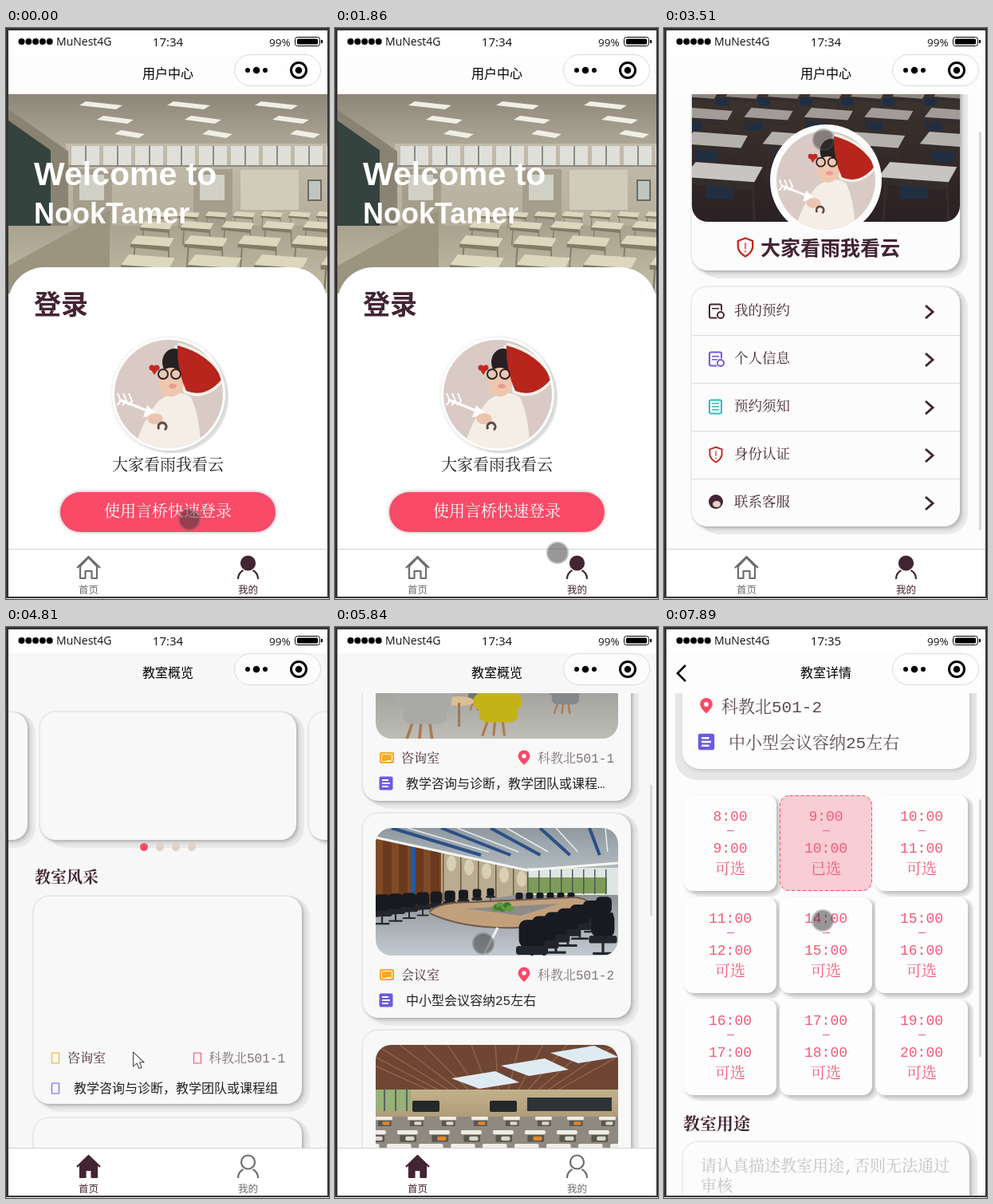
An HTML page with a canvas for the animation above (8000 ms loop, 405x716 px).

```html
<!DOCTYPE html>
<html lang="zh-CN">
<head>
<meta charset="utf-8">
<style>
html, body { margin: 0; width: 100%; height: 100%; overflow: hidden; background: #383436; }
canvas { display: block; width: 405px; height: 716px; }
</style>
</head>
<body>
<canvas id="stage" width="405" height="716"></canvas>
<script>
const ctx = document.getElementById('stage').getContext('2d');
const LOOP = 8000, TICK = 120;
const UI = '"Open Sans", "Noto Sans CJK SC", sans-serif';
const SERIF = '"Liberation Mono", "Noto Serif CJK SC", "Noto Sans CJK SC", monospace';
const PLAIN = '"Liberation Mono", "Noto Sans CJK SC", monospace';
const ARIAL = '"Liberation Sans", sans-serif';
const PLUM = '#432433', PINK = '#f94a68', ORANGE = '#f9a825', VIOLET = '#6a5be2', RED = '#c4281f', GREY = '#6d6d6d';
const APP = 'NookTamer', NICK = '大家看雨我看云', CARRIER = 'MuNest4G';

// Part of a move done: it advances in `count` equal hops, one per tick.
function progress(t, start, count) {
  return Math.max(0, Math.min(count, Math.floor((t - start) / TICK) + 1)) / count;
}

function rect(color, x, y, w, h) { ctx.fillStyle = color; ctx.fillRect(x, y, w, h); }
function trace(x, y, w, h, r) { ctx.beginPath(); ctx.roundRect(x, y, w, h, r); }
function box(color, x, y, w, h, r) { trace(x, y, w, h, r); ctx.fillStyle = color; ctx.fill(); }
function frame(color, lw, x, y, w, h, r) { trace(x, y, w, h, r); ctx.strokeStyle = color; ctx.lineWidth = lw; ctx.stroke(); }
function disc(color, x, y, rx, ry = rx) {
  ctx.beginPath(); ctx.ellipse(x, y, rx, ry, 0, 0, 7); ctx.fillStyle = color; ctx.fill();
}
function ring(color, lw, x, y, r, from = 0, to = 2) {
  ctx.beginPath(); ctx.arc(x, y, r, from * Math.PI, to * Math.PI);
  ctx.strokeStyle = color; ctx.lineWidth = lw; ctx.stroke();
}
function path(p) { ctx.beginPath(); for (let i = 0; i < p.length; i += 2) ctx.lineTo(p[i], p[i + 1]); }
function poly(color, ...p) { path(p); ctx.fillStyle = color; ctx.fill(); }
function line(color, lw, ...p) { path(p); ctx.strokeStyle = color; ctx.lineWidth = lw; ctx.stroke(); }
function shape(d, fill, stroke, lw) {
  const p = new Path2D(d);
  if (stroke) { ctx.strokeStyle = stroke; ctx.lineWidth = lw; ctx.stroke(p); }
  if (fill) { ctx.fillStyle = fill; ctx.fill(p); }
}
function fade(from, to, x, y, w, h) {
  const g = ctx.createLinearGradient(0, y, 0, y + h);
  g.addColorStop(0, from); g.addColorStop(1, to);
  rect(g, x, y, w, h);
}
// Upright strip between two sloping edges, given as functions of x.
function wall(color, x0, x1, top, bottom) {
  poly(color, x0, top(x0), x1, top(x1), x1, bottom(x1), x0, bottom(x0));
}
function text(s, x, y, size, color, { font = UI, weight = 400, align = 'left' } = {}) {
  ctx.font = `${weight} ${size}px ${font}`;
  ctx.textAlign = align;
  ctx.fillStyle = color;
  ctx.fillText(s, x, y + size * 0.37);
}
const thin = (s, x, y, size, color, align) => text(s, x, y, size, color, { font: SERIF, weight: 300, align });
const centered = (s, x, y, size, color) => text(s, x, y, size, color, { align: 'center' });
function group(x, y, scale, draw) {
  ctx.save(); ctx.translate(x, y); ctx.scale(scale, scale); draw(); ctx.restore();
}
function clipped(x, y, w, h, r, draw) {
  ctx.save(); trace(x, y, w, h, r); ctx.clip(); draw(); ctx.restore();
}
function softBox(color, x, y, w, h, r, blur, shadow, off) {
  ctx.save();
  Object.assign(ctx, { shadowColor: shadow, shadowBlur: blur, shadowOffsetX: off, shadowOffsetY: off });
  box(color, x, y, w, h, r);
  ctx.restore();
}
function card(x, y, w, h, color = '#fcfcfc') {
  box('#eaeaea', x + 8, y, w + 2, h + 10, 26);
  softBox(color, x, y, w, h, 20, 5, '#bdbdbd', 3);
  frame('rgba(0,0,0,.05)', 2, x - 1, y - 1, w + 2, h + 2, 20);
}
function scene(draw, x, y, w, h, r) {
  clipped(x, y, w, h, r, () => { ctx.translate(x, y); ctx.scale(w / 304, h / 160); draw(); });
}

// --- pictures ---
function officeChair(x, y, s) {
  group(x, y, s, () => {
    box('#171a20', -9, -18, 18, 19, 5);
    box('#22252b', -11, 0, 22, 6, 2);
    rect('#24272c', -1, 4, 2, 10); rect('#24272c', -8, 13, 16, 2);
  });
}
function meeting() {
  const cornice = x => 12 + x * 0.22, skirting = x => 112 - x * 0.16;
  fade('#8f999f', '#b4bcc1', 0, 0, 304, 55);
  fade('#8b8f92', '#c2c9d0', 0, 80, 304, 80);
  for (let i = 0; i < 5; i++) {
    const x = 20 + i * 62;
    line('#2c4f86', 4, x, 0, 120 + x * 0.6, 34);
    line('#e8ecec', 1.5, x + 20, 0, 130 + x * 0.6, 30);
  }
  wall('#6b3a1e', 0, 82, cornice, skirting);
  for (let x = 0; x < 82; x += 20) wall('#7f4a26', x, x + 9, cornice, skirting);
  wall('#1f5ba6', 44, 50, cornice, skirting);
  wall('#b9ac90', 82, 190, cornice, skirting);
  for (let x = 84; x < 190; x += 22) {
    wall('#6d5a46', x, x + 1.5, cornice, skirting);
    disc('#d9cfb4', x + 11, cornice(x) + 14, 6, 10);
  }
  rect('#dfe5e2', 190, 50, 114, 34); rect('#7d9c58', 190, 62, 100, 20);
  for (let x = 190; x < 300; x += 14) rect('#4d5657', x, 52, 1.5, 31);
  line('#f6f7f4', 3, 0, 12, 190, 53, 304, 44);
  for (let i = 0; i < 9; i++) officeChair(8 + i * 17, 104 - i * 2.4, 1.15 - i * 0.08);
  for (let i = 0; i < 6; i++) officeChair(180 + i * 13, 90, 0.5);
  shape('M68 106 Q78 94 120 94 L250 88 Q282 92 240 104 L178 124 Q110 126 68 106', '#c3a07c', '#6f5a49', 4);
  shape('M112 101 L230 95 L182 110 Z', '#8d8c88');
  line('#f0f2f2', 3, 153, 125, 136, 158);
  for (let i = 0; i < 7; i++) disc(i % 2 ? '#397b31' : '#639b3d', 150 + i * 3, 101 - i % 3 * 2, 5, 4);
  for (let i = 0; i < 7; i++) officeChair(286 - i * 15, 106 + i * 7, 1.1 + i * 0.12);
  officeChair(285, 135, 1.6);
}
function training() {
  rect('#8f8a80', 0, 0, 304, 160);
  rect('#6f4633', 0, 0, 304, 58);
  for (let i = 0; i < 14; i++) line('#94694f', 1.2, i * 30 - 60, 0, 70 + i * 12, 58);
  for (let i = 0; i < 3; i++) shape(`M${95 + i * 62} ${42 - i * 16} l55 -9 l30 14 l-50 8 Z`, '#dfebf2');
  fade('#c3b08b', '#b09c79', 0, 56, 304, 34);
  rect('#95b277', 0, 56, 44, 26);
  for (let x = 10; x < 44; x += 14) rect('#5d6260', x, 55, 2, 28);
  for (const x of [46, 143]) box('#22272a', x, 70, 34, 14, 2);
  rect('#2c3436', 190, 66, 106, 17);
  for (let row = 0; row < 4; row++) for (let i = 0; i < 9; i++) {
    group(i * 40 - row * 13, 90 + row * 17, 0.7 + row * 0.16, () => {
      rect('#59564f', 4, 7, 24, 10);
      box('#efede6', 0, 0, 30, 6, 2);
      box((i + row) % 3 ? '#d9d7d0' : '#df862a', 12, 9, 13, 6, 2);
    });
  }
}
function lounge() {
  fade('#d3d3cc', '#8f9193', 0, 0, 304, 110);
  fade('#a3a39f', '#bdbcb6', 0, 100, 304, 60);
  const seat = (x, y, s, color) => group(x, y, s, () => {
    for (let k = -16; k <= 16; k += 11) line('#ad794e', 3, k * 0.7, 5, k * 1.2, 28);
    box(color, -30, -24, 58, 22, 11); box(color, -23, -8, 46, 20, 9);
  });
  seat(132, 105, 0.7, '#6f7376'); seat(238, 108, 0.75, '#85888a');
  disc('#d9bf94', 104, 113, 20, 6); rect('#9f7958', 103, 115, 3, 30);
  seat(62, 127, 1.2, '#a9aaa6'); seat(154, 127, 1.05, '#c4b219');
}
function deskRow(y, s, top, leg, shift) {
  for (let x = shift; x < 450; x += 58 * s) group(x, y, s, () => {
    line(leg, 1.6, 5, 8, 3, 35); line(leg, 1.6, 41, 12, 42, 35);
    shape('M0 8 L42 12 V17 L0 13 Z', leg);
    shape('M7 0 L47 3 L42 12 L0 9 Z', top);
  });
}
function loginHero() {
  const left = x => 100 + x * 0.7, floor = x => 300 - x * 0.55;
  fade('#8c8778', '#b0aa9b', 3, 83, 400, 70);
  for (let row = 0; row < 3; row++) for (let i = 0; i < 3; i++)
    shape(`M${100 + i * 110 + row * 22} ${92 + row * 18} l${46 - row * 8} 5 l-8 5 l-${46 - row * 8} -5 Z`, '#f0efe6');
  fade('#c3bcab', '#b3ac99', 75, 145, 328, 115);
  wall('#8a8373', 3, 78, left, floor);
  wall('#34433d', 3, 56, x => left(x) + 14, x => floor(x) - 16);
  for (let x = 82; x < 403; x += 40) { rect('#dfe0da', x, 148, 35, 24); rect('#8d8b7f', x + 17, 148, 2, 24); }
  rect('#8d8a7e', 78, 172, 325, 2);
  for (const x of [84, 235]) { rect('#a59e8c', x, 177, 49, 75); rect('#d0d0c5', x + 8, 184, 31, 32); }
  rect('#d1cbba', 294, 178, 73, 50);
  rect('#6c6c64', 378, 190, 18, 27); rect('#bfc5bf', 380, 192, 14, 23);
  fade('#a9a28e', '#c3bca7', 3, 248, 400, 85);
  wall('#9b947f', 3, 130, floor, () => 333);
  for (let i = 0; i < 4; i++) deskRow(230 + i * i * 3 + i * 9, 0.6 + i * 0.28, '#ded7be', '#847b66', 180 - i * 12);
}
function darkClass() {
  fade('#40382f', '#2b2023', 35, 91, 336, 200);
  for (let i = 0; i < 5; i++) {
    const s = 0.5 + i * 0.4, y = 112 + i * 10 + i * i * 4;
    for (let x = i * 13; x < 400; x += 58 * s) box('#202e43', x, y + 10 * s, 17 * s, 12 * s, 4);
    deskRow(y, s, `hsl(30 5% ${45 + i * 8}%)`, '#332d2e', 25);
  }
}
function portrait() {
  rect('#d9cac5', -70, -70, 140, 140);
  shape('M-12 8 Q10 -8 28 4 Q40 30 40 72 L-44 72 Q-32 30 -12 8', '#f5eee7');
  const hat = 'M11 -61 Q52 -50 67 -19 Q46 6 22 -4 Q10 -30 11 -61';
  shape(hat, null, '#f8f2eb', 7);
  disc('#272022', 7, -40, 15, 17);
  disc('#efc7af', 3, -15, 16, 18);
  shape(hat, '#b7251c');
  for (const x of [-7, 9]) ring('#2b2325', 2, x, -25, 6);
  disc('#e99c8e', 5, -10, 5, 3);
  for (const x of [-21, -15]) disc(RED, x, -33, 3.5);
  shape('M-22.500 -31 H-13.500 L-18 -24 Z', RED);
  line('#fff', 3, -62, 7, -24, 22);
  for (let x = -62; x < -46; x += 7) line('#fff', 2, x - 2, -1, x + 2, 9, x - 3, 14);
  shape('M-27 14 L-14 26 L-32 29 Z', '#fff');
  disc('#edc4b0', -17, 31, 10, 7);
  ring('#614846', 3, -8, 41, 5, 0.8, 2.3);
}
function avatar(x, y, r) {
  clipped(x - r, y - r, 2 * r, 2 * r, r, () => group(x, y, r / 68, portrait));
}

// --- icons ---
const board = (x, y, s = 1) => group(x, y, s, () => {
  box(ORANGE, -9, -7, 18, 14, 2); frame('#fff', 1, -6.5, -4.5, 13, 9, 1); rect('#fff', 0, 3, 5, 2);
});
const pin = (x, y, s = 1) => group(x, y, s, () => {
  shape('M0 9 Q-7.500 2 -7.500 -2 A7.500 7.500 0 0 1 7.500 -2 Q7.500 2 0 9', PINK);
  disc('#fff', 0, -2, 2.7);
});
const note = (x, y, s = 1) => group(x, y, s, () => {
  box(VIOLET, -8.5, -8.5, 17, 17, 2);
  for (let i = 0; i < 3; i++) rect('#fff', -5, i * 4 - 5, i === 1 ? 10 : 8, 2);
});
const shield = (x, y, s) => group(x, y, s, () => {
  shape('M0 -10 L8 -7 V0 Q7 6 0 10 Q-7 6 -8 0 V-7 Z', null, RED, 2);
  rect('#e9766d', -1, -5, 2, 7); rect('#e9766d', -1, 3.5, 2, 2);
});
function sheet(color, ...rows) {
  frame(color, 2, -8, -8.5, 15, 17, 2);
  for (const y of rows) rect(color, -5, y, 9, 1.5);
}
function badge(color) { disc('#fcfcfc', 6, 5, 6); ring(color, 2, 6, 5, 4); }
const menu = [
  ['我的预约', () => { sheet(PLUM, -4); badge(PLUM); }],
  ['个人信息', () => { sheet(VIOLET, -4, 0); badge(VIOLET); }],
  ['预约须知', () => sheet('#2bbdc4', -5, -1, 3)],
  ['身份认证', () => shield(0, 0, 0.95)],
  ['联系客服', () => { disc(PLUM, 0, -1, 9); disc('#e8cfc7', 1, 2, 5, 4); }]
];

// --- pages ---
function page(color) { rect(color, 3, 83, 400, 631); }
function scrolled(dy, draw) { ctx.save(); ctx.translate(0, -dy); draw(); ctx.restore(); }
function scrollbar(y, h) { box('#d9d9d9', 395, y, 3, h, 1.5); }

function login() {
  page('#fff');
  loginHero();
  text('Welcome to', 35, 182, 41, '#fff', { font: ARIAL, weight: 700 });
  text(APP, 35, 232, 36, '#fff', { font: ARIAL, weight: 700 });
  box('#fff', 3, 300, 400, 430, 45);
  text('登录', 35, 346, 34, PLUM, { weight: 700 });
  disc('#e4e4e4', 209, 463, 70);
  softBox('#fff', 133, 388, 142, 142, 71, 4, '#ccc', 1);
  avatar(204, 459, 68);
  thin(NICK, 203, 548, 20, '#222', 'center');
  softBox(PINK, 68, 582, 270, 50, 25, 5, 'rgba(90,60,60,.4)', 0);
  thin('使用言桥快速登录', 203, 606, 20, '#fff', 'center');
}
function profile(t) {
  page('#fcfcfc');
  scrolled(48 * progress(t, 3270, 3), () => {
    card(35, 91, 336, 261);
    clipped(35, 91, 336, 200, 20, darkClass);
    disc('#fcfcfc', 203, 239, 70);
    avatar(203, 239, 62);
    shield(102, 323, 1.15);
    text(NICK, 121, 324, 25, PLUM, { weight: 700 });
    card(35, 373, 336, 300);
    menu.forEach(([label, icon], i) => {
      const y = 403 + i * 60;
      if (i) rect('#dcdcdc', 35, y - 30, 336, 1);
      group(65, y, 1, icon);
      thin(label, 88, y - 1, 17.5, PLUM);
      line(PLUM, 3, 328, y - 7, 337, y + 1, 328, y + 9);
    });
  });
  if (t >= 3270 && t < 4020) scrollbar(130, 500);
}
const rooms = [
  ['咨询室', lounge, '教学咨询与诊断，教学团队或课程组'],
  ['会议室', meeting, '中小型会议容纳25左右'],
  ['研讨室', training, '小组研讨与教学活动']
];
const place = i => '科教北501-' + (i + 1);
function roomCard(i, ready, photos) {
  const [name, picture, about] = rooms[i], y = 338 + i * (ready ? 272 : 278);
  const row = y + 202, low = row + (ready ? 32 : 38), fit = ready ? 15 : 16;
  card(35, y, 336, ready ? 256 : 260, '#f8f8f8');
  if (photos) scene(picture, 51, y + 18, 304, 160, 20);
  if (ready) { board(65, row); pin(237, row); note(64, low); }
  else [[ORANGE, 57.5, row], [PINK, 235.5, row], [VIOLET, 57.5, low]].forEach(([c, x, cy]) => frame(c, 1, x, cy - 6, 9, 13, 0));
  thin(name, ready ? 83 : 77, row, 16, PLUM);
  thin(place(i), 254, row, 16, '#7c7277');
  const short = about.length > fit ? about.slice(0, fit) + '…' : about;
  text(short, ready ? 89 : 85, low, 16, '#222', { font: PLAIN, weight: 300 });
}
function home(t) {
  const scroll = 376 * progress(t, 5330, 2), ready = t >= 4930, photos = t >= 5180;
  page('#f7f7f7');
  scrolled(scroll, () => {
    rooms.forEach((room, i) => {
      const x = 43 + (i - 1) * 337;
      card(x, 107, 321, 160, '#f8f8f8');
      if (photos) scene(room[1], x, 107, 321, 160, 20);
    });
    for (let i = 0; i < 4; i++) disc(i ? '#e0d1c8' : PINK, 173 + i * 20, 276, 5);
    text('教室风采', 36, 314, 20, PLUM, { font: SERIF, weight: 700 });
    if (t >= 4810) rooms.forEach((_, i) => roomCard(i, ready, photos));
  });
  if (scroll) scrollbar(32 + scroll * 0.44, 165);
}
function slot(i, picked) {
  const x = 25 + i % 3 * 120, y = 461 + Math.floor(i / 3) * 128, c = x + 58, color = '#f45a78';
  const hour = 8 + i + (i > 3 ? 2 : 0) + (i > 7 ? 1 : 0);
  if (picked) {
    box('#f8cdd4', x, y, 116, 120, 12);
    ctx.setLineDash([4, 3]); frame(PINK, 1, x + 0.5, y + 0.5, 115, 119, 12); ctx.setLineDash([]);
  } else {
    box('#ececec', x + 8, y + 2, 115, 125, 14);
    softBox('#fdfdfd', x, y, 116, 120, 12, 5, '#b8b8b8', 3);
  }
  const start = i > 3 ? hour : 8 + i;
  thin(slotHour(i) + ':00', c, y + 25, 18, color, 'center');
  rect(color, c - 4, y + 44, 9, 1);
  thin(slotHour(i) + 1 + ':00', c, y + 65, 18, color, 'center');
  thin(picked ? '已选' : '可选', c, y + 92, 19, color, 'center');
}
// Lunch and supper breaks fall after 12:00 and 18:00.
function slotHour(i) { return 8 + i + (i >= 4 ? 2 : 0) + (i >= 8 ? 1 : 0); }
function detail(t) {
  const known = t >= 6650;
  page('#fcfcfc');
  scrolled(250 * progress(t, 7310, 3), () => {
    if (t >= 6770) scene(meeting, 3, 83, 400, 240, [0, 0, 24, 24]);
    if (known) disc(PINK, 203, 246, 5);
    box('#e6e6e6', 14, 275, 378, 167, 28);
    softBox('#fdfdfd', 23, 263, 360, 165, 22, 5, '#c4c4c4', 2);
    if (known) {
      board(53, 301, 1.05); pin(53, 349, 1.05); note(53, 394, 1.2);
      thin(rooms[1][0], 72, 301, 21, '#5c4a50');
      thin(place(1), 72, 349, 21, '#5c4a50');
      thin(rooms[1][2], 81, 394, 21, '#5c4a50');
    }
    if (t >= 6890) for (let i = 0; i < 9; i++) slot(i, i === 1 && t >= 7890);
    text('教室用途', 24, 872, 21, PLUM, { font: SERIF, weight: 700 });
    card(24, 896, 359, 150);
    thin('请认真描述教室用途,否则无法通过', 46, 926, 20, '#c2c2c2');
    thin('审核', 46, 951, 20, '#c2c2c2');
  });
  if (t >= 7460) scrollbar(216, 323);
}

// --- app frame ---
function header(title, color, clock, back) {
  rect('#fff', 3, 3, 400, 30);
  rect(color, 3, 33, 400, 50);
  for (let i = 0; i < 5; i++) disc('#000', 19.5 + i * 8.8, 17, 4);
  text(CARRIER, 63, 17, 14, '#111');
  centered(clock, 203, 17, 15, '#111');
  text('99%', 330, 18, 13.5, '#111');
  frame('#000', 1, 362.5, 11.5, 31, 11, 3); box('#000', 365, 13.5, 26, 7, 1.5); rect('#000', 395, 15, 2, 4);
  centered(title, 203, 57.5, 16, '#000');
  box('rgba(255,255,255,.65)', 286, 33, 109, 40, 20); frame('#dadada', 1, 286.5, 33.5, 108, 39, 19.5);
  for (let i = -1; i < 2; i++) disc('#000', 314 + i * 11, 53, i ? 3 : 4.3);
  ring('#000', 3, 367, 53, 9.5); disc('#000', 367, 53, 4.3);
  if (back) line('#000', 2.6, 27, 48, 17, 58, 27, 68);
}
function tabs(onHome) {
  const [homeInk, mineInk] = onHome ? [PLUM, GREY] : [GREY, PLUM];
  rect('#fff', 3, 653, 400, 61); rect('#d4d4d4', 3, 653, 400, 1);
  ctx.lineJoin = 'round';
  group(103.5, 677, 1, () => {
    shape('M-10.500 -2 V13 H-4 V4 H4 V13 H10.500 V-2 L0 -13 Z', onHome && PLUM, homeInk, 2.2);
    shape('M-14.500 0 L0 -14 L14.500 0', null, homeInk, 2.4);
  });
  ctx.lineJoin = 'miter';
  if (!onHome) disc(PLUM, 303.5, 671, 9);
  ring(mineInk, 2.2, 303.5, 671, 8.5);
  ring(mineInk, 2.2, 303.5, 691, 12.5, 1, 1.34);
  ring(mineInk, 2.2, 303.5, 691, 12.5, 1.66, 2);
  centered('首页', 103.5, 704, 12.5, homeInk);
  centered('我的', 303.5, 704, 12.5, mineInk);
}
function consent(t) {
  const shown = progress(t, 680, 2);
  rect(`rgba(0,0,0,${0.6 * shown})`, 3, 3, 400, 711);
  scrolled(-310 * (1 - shown), () => {
    box('#ebebeb', 3, 404, 400, 312, [7, 7, 0, 0]);
    disc('#f6e6ec', 36, 450, 13);
    text(APP + ' 申请', 59, 450, 15.5, '#111');
    text('获取你的昵称、头像', 23, 506, 17.7, '#111');
    clipped(23, 551, 38, 37, 2, () => group(42, 570, 0.29, portrait));
    text(NICK, 73, 558, 16.2, '#111');
    text('言桥个人信息', 73, 583, 15, '#8a8a8a');
    line('#35dc4b', 2.2, 363, 569, 370, 576, 383, 562);
    box('#f2f2f2', 81, 638, 113, 38, 3);
    centered('拒绝', 138, 657, 15, '#07b45c');
    box(t < 1710 ? '#07c160' : '#06ae56', 213, 638, 112, 38, 3);
    centered('允许', 269, 657, 15, '#fff');
  });
}
function cursor(t) {
  let x = 230, y = 616;
  const move = (start, hops, toX, toY) => {
    const p = progress(t, start, hops);
    x += (toX - x) * p;
    y += (toY - y) * p;
  };
  move(130, 2, 265, 632);   // allow button
  move(1170, 4, 279, 658);
  move(2140, 1, 279, 654);
  move(3000, 2, 210, 544);  // drag the menu
  move(3270, 3, 200, 140);
  move(3660, 4, 109, 688);  // home tab
  move(4170, 3, 160, 534);
  move(5600, 3, 186, 397);  // room card
  move(6380, 2, 214, 413);
  move(7160, 1, 194, 491);  // drag to the slots
  move(7310, 3, 204, 300);
  move(7740, 2, 199, 368);
  const arrow = t >= 130 && t < 1530 || t >= 4170 && t < 5840;
  if (arrow) group(x, y, 1, () => shape('M0 0 V16 L4 12.500 L7 19 L9.500 18 L7 11.500 H12 Z', '#fff', '#111', 1.6));
  else {
    disc('rgba(50,50,50,.5)', x, y, 12);
    ring('rgba(90,90,90,.38)', 2.5, x, y, 12.8);
  }
}

function draw(t) {
  const onHome = t >= 4290, onDetail = t >= 5990, arrived = t >= 6230;
  rect('#383436', 0, 0, 405, 715);
  rect('#e6e6e6', 0, 715, 405, 1);
  clipped(3, 3, 400, 710, 0, () => {
    if (t < 2140) login();
    else if (t < 4690) profile(t);
    else if (!arrived) home(t);
    if (!arrived) tabs(onHome);
    if (onDetail) {
      ctx.save();
      ctx.translate(320 * (1 - progress(t, 5990, 3)), 0);
      detail(t);
      ctx.restore();
    }
    const title = onDetail ? '教室详情' : onHome ? '教室概览' : '用户中心';
    header(title, t >= 4690 && t < 7460 ? '#f7f7f7' : '#fdfdfd', t < 7460 ? '17:34' : '17:35', onDetail);
    if (t >= 680 && t < 1860) consent(t);
    cursor(t);
  });
}
const start = performance.now();
function tick() {
  draw((performance.now() - start) % LOOP);
  requestAnimationFrame(tick);
}
tick();
</script>
</body>
</html>
```
